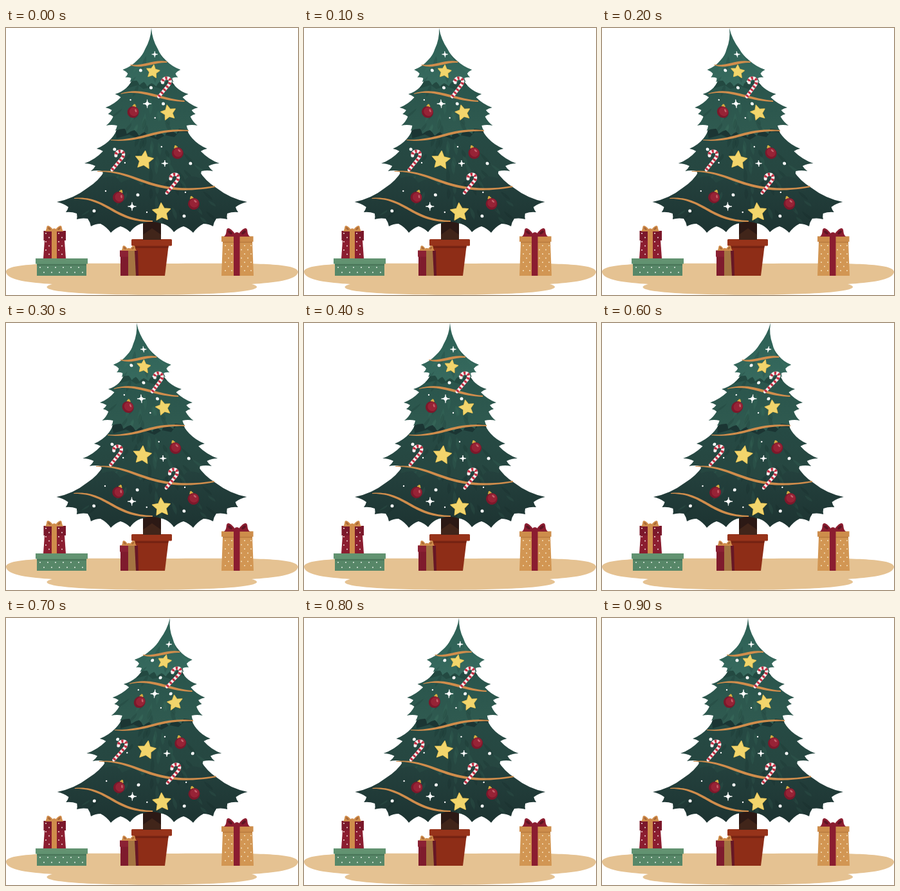
Recreate the animation shown at these times as an HTML page with a canvas. Size 454 by 416 pixels, loop 1000 ms.

```html
<!DOCTYPE html>
<html lang="en">
<head>
<meta charset="utf-8">
<title>Swaying tree</title>
<style>
html, body { margin: 0; width: 100%; height: 100%; overflow: hidden; background: #fff; }
canvas { display: block; }
</style>
</head>
<body>
<canvas id="stage" width="454" height="416"></canvas>
<script>
const ctx = document.getElementById('stage').getContext('2d');
const MID = 227, BASE = 320, STEP = 100;
const SWAY = [-1, -17, -29, -24, 0, 22, 35, 28, 14, 0];
const GOLD = '#d08d4c', RED = '#8b1d30', WHITE = '#fff';
let sway = 0;

// The trunk end stays put; displacement grows with height squared.
function bend(x, y) {
  const h = Math.max(0, BASE - y) / BASE;
  return [x + sway * h * h, y];
}

function at(x, y, draw) {
  const h = Math.max(0, BASE - y) / BASE;
  ctx.save();
  ctx.transform(1, 0, -2 * sway * h / BASE, 1, ...bend(x, y));
  draw();
  ctx.restore();
}

function fill(color) {
  ctx.fillStyle = color;
  ctx.fill();
}

function poly(color, ...p) {
  ctx.beginPath();
  for (let i = 0; i < p.length; i += 2) ctx.lineTo(p[i], p[i + 1]);
  ctx.closePath();
  fill(color);
}

function rect(color, x, y, w, h) {
  ctx.fillStyle = color;
  ctx.fillRect(x, y, w, h);
}

function oval(color, x, y, rx, ry = rx, turn = 0) {
  ctx.beginPath();
  ctx.ellipse(x, y, rx, ry, turn, 0, Math.PI * 2);
  fill(color);
}

function random(seed) {
  return () => (seed = seed * 16807 % 2147483647) / 2147483647;
}

// Right half of each tier; the left half is its mirror image.
const TIERS = [
  { top: '#25433f', low: '#1d3432', y0: 218, y1: 318, w: 140, n: 30, pts: [
    227, 190, 300, 222, 327, 249, 375, 271, 357, 279, 361, 287, 344, 289, 344, 298,
    327, 297, 322, 309, 307, 305, 291, 319, 276, 309, 261, 318, 249, 307, 239, 304, 227, 302] },
  { top: '#264a44', low: '#264640', y0: 165, y1: 240, w: 100, n: 24, pts: [
    227, 130, 280, 154, 290, 172, 313, 188, 303, 192, 332, 211, 315, 215, 322, 223,
    304, 223, 303, 234, 285, 231, 275, 241, 258, 235, 244, 245, 227, 239] },
  { top: '#2a554c', low: '#2f5a50', y0: 88, y1: 164, w: 70, n: 18, pts: [
    227, 68, 256, 78, 266, 93, 284, 103, 275, 108, 299, 124, 289, 128, 295, 134,
    287, 138, 298, 152, 281, 152, 284, 160, 269, 157, 266, 165, 254, 159,
    247, 168, 238, 162, 233, 170, 227, 165] },
  { top: '#2f6257', low: '#376a5e', y0: 30, y1: 88, w: 42, n: 9, pts: [
    227, 0, 237, 33, 249, 50, 272, 65, 264, 71, 268, 77, 259, 78, 261, 84,
    250, 82, 246, 89, 239, 84, 234, 91, 227, 86] }
];

function outline(flat) {
  const half = [];
  for (let i = 0; i < flat.length; i += 2) half.push([flat[i], flat[i + 1]]);
  ctx.beginPath();
  ctx.moveTo(...bend(...half[0]));
  const side = (list, flip) => {
    for (let i = 1; i < list.length; i++) {
      const [ax, ay] = list[i - 1], [bx, by] = list[i];
      const sag = 0.12 * flip;
      const cx = (ax + bx) / 2 - (by - ay) * sag;
      const cy = (ay + by) / 2 + (bx - ax) * sag;
      ctx.quadraticCurveTo(...bend(cx, cy), ...bend(bx, by));
    }
  };
  side(half, 1);
  side(half.map(([x, y]) => [2 * MID - x, y]).reverse(), 1);
  ctx.closePath();
}

function leaves(tier, seed) {
  const rnd = random(seed);
  for (let i = 0; i < tier.n; i++) {
    const y = tier.y0 + rnd() * (tier.y1 - tier.y0);
    const spread = (rnd() * 2 - 1) * tier.w * (0.35 + 0.65 * (y - tier.y0) / (tier.y1 - tier.y0));
    const x = MID + spread, len = 14 + rnd() * 16, lean = spread / tier.w;
    const ex = x + lean * len * 1.2, ey = y + len * (1 - Math.abs(lean) * 0.55);
    ctx.beginPath();
    ctx.moveTo(...bend(x, y));
    ctx.quadraticCurveTo(...bend((x + ex) / 2 + 7, (y + ey) / 2), ...bend(ex, ey));
    ctx.quadraticCurveTo(...bend((x + ex) / 2 - 5, (y + ey) / 2 + 1), ...bend(x, y));
    fill(i % 2 ? 'rgba(75,130,112,.13)' : 'rgba(8,24,25,.13)');
  }
}

function shade(color, ...p) {
  ctx.beginPath();
  for (let i = 0; i < p.length; i += 2) ctx.lineTo(...bend(p[i], p[i + 1]));
  fill(color);
}

function drawTier(tier, i) {
  outline(tier.pts);
  const g = ctx.createLinearGradient(0, tier.y0, 0, tier.y1);
  g.addColorStop(0, tier.top);
  g.addColorStop(1, tier.low);
  ctx.save();
  fill(g);
  ctx.clip();
  leaves(tier, 71 + i * 37);
  if (i === 1) shade('#1b3533', 170, 150, 284, 150, 285, 163, 270, 161, 262, 170, 248, 167,
    236, 174, 220, 168, 205, 172, 192, 166, 172, 172);
  if (i === 2) shade('#234941', 196, 76, 258, 76, 266, 90, 252, 89, 244, 96, 230, 91,
    214, 95, 206, 89, 188, 94);
  ctx.restore();
}

// Ribbon band that tapers to a point at both ends.
function garland(x0, y0, x1, y1, x2, y2, x3, y3) {
  ctx.beginPath();
  ctx.moveTo(...bend(x0, y0));
  ctx.bezierCurveTo(...bend(x1, y1 - 2), ...bend(x2, y2 - 2), ...bend(x3, y3 - 1));
  ctx.lineTo(...bend(x3, y3 + 1));
  ctx.bezierCurveTo(...bend(x2, y2 + 3), ...bend(x1, y1 + 3), ...bend(x0, y0 + 1));
  fill(GOLD);
}

function star(x, y, r, turn) {
  at(x, y, () => {
    ctx.rotate(turn);
    ctx.beginPath();
    for (let k = 0; k < 10; k++) {
      const a = k * Math.PI / 5 - Math.PI / 2, d = k % 2 ? r * 0.5 : r;
      ctx.lineTo(Math.cos(a) * d, Math.sin(a) * d);
    }
    ctx.closePath();
    ctx.lineJoin = 'round';
    ctx.lineWidth = 1.5;
    ctx.strokeStyle = '#e3bd50';
    ctx.stroke();
    fill('#f2d56c');
  });
}

function bauble(x, y, tilt) {
  at(x, y, () => {
    ctx.rotate(tilt);
    oval('#d8ae42', 0, -11, 1.8);
    rect('#d8ae42', -2.8, -10.5, 5.6, 4);
    oval('#7c182b', 0, 0, 9);
    oval('#972336', 1, -1, 7);
    oval('#c5606a', 3.6, -3, 1.3, 2.6, -0.5);
  });
}

function cane(x, y) {
  at(x, y, () => {
    ctx.beginPath();
    ctx.moveTo(0, 0);
    ctx.lineTo(16, -19);
    ctx.bezierCurveTo(20, -25, 17, -29, 13, -29);
    ctx.bezierCurveTo(8, -29, 6, -26, 6, -22);
    ctx.lineCap = 'round';
    ctx.lineWidth = 5;
    ctx.strokeStyle = '#f7eeee';
    ctx.stroke();
    ctx.lineCap = 'butt';
    ctx.setLineDash([3, 3.3]);
    ctx.strokeStyle = '#c22f43';
    ctx.stroke();
  });
}

function sparkle(x, y, r) {
  at(x, y, () => {
    ctx.beginPath();
    ctx.moveTo(0, -r);
    for (const [px, py] of [[r, 0], [0, r], [-r, 0], [0, -r]]) ctx.quadraticCurveTo(0, 0, px, py);
    ctx.lineWidth = 0.8;
    ctx.strokeStyle = WHITE;
    ctx.stroke();
    fill(WHITE);
  });
}

const dot = (x, y, r) => at(x, y, () => oval(WHITE, 0, 0, r));

function drawTree() {
  rect('#41251a', 213, 300, 28, 30);
  poly('#2c1915', 213, 300, 241, 300, 241, 322, 227, 312, 213, 322);
  TIERS.forEach(drawTier);

  garland(194, 57, 213, 62, 230, 50, 251, 53);
  garland(179, 102, 213, 92, 240, 112, 278, 114);
  garland(163, 174, 215, 177, 228, 156, 284, 160);
  garland(142, 223, 203, 219, 223, 264, 325, 247);
  garland(106, 265, 157, 262, 168, 301, 228, 301);

  [[238, 107], [165, 221], [250, 257]].forEach(p => cane(...p));
  [[229, 68, 10.5, 0.15], [253, 132, 12, -0.2], [215, 206, 14.5, 0.12], [242, 287, 14.5, -0.06]]
    .forEach(p => star(...p));
  [[198, 131, 0.2], [267, 195, -0.3], [175, 264, 0.4], [292, 274, -0.35]].forEach(p => bauble(...p));
  [[232, 41, 4.5], [220, 118, 6.5], [247, 211, 5], [196, 278, 6.5]].forEach(p => sparkle(...p));
  [[210, 66], [226, 93], [245, 118], [169, 189], [287, 211], [205, 260], [137, 285], [277, 293]]
    .forEach(p => dot(...p, 2.5));
  [[194, 112], [232, 140], [242, 185], [185, 210], [155, 254], [279, 256], [219, 287], [242, 83]]
    .forEach(p => dot(...p, 1.2));
}

function bow(x, y, w, h, color, inner) {
  for (const s of [-1, 1]) {
    ctx.beginPath();
    ctx.moveTo(x, y);
    ctx.bezierCurveTo(x + s * w * 0.35, y - h * 0.9, x + s * w * 0.8, y - h * 1.4, x + s * w * 0.82, y - h * 0.6);
    ctx.quadraticCurveTo(x + s * w * 0.85, y - h * 0.2, x + s * w, y);
    ctx.closePath();
    fill(color);
    oval(inner, x + s * w * 0.53, y - h * 0.5, w * 0.2, h * 0.16, -s * 0.7);
  }
  oval(color, x, y - h * 0.25, w * 0.2, h * 0.27);
}

function speckle(x, y, w, h, gap, r, color) {
  for (let row = 0, py = y; py <= y + h; row++, py += gap * 0.65)
    for (let px = x + (row % 2) * gap / 2; px <= x + w; px += gap) oval(color, px, py, r);
}

function drawGround() {
  oval('#e5c292', 227, 380, 227, 12);
  ctx.beginPath();
  ctx.moveTo(0, 380);
  ctx.bezierCurveTo(0, 364, 95, 367, 227, 367);
  ctx.bezierCurveTo(360, 367, 454, 364, 454, 380);
  ctx.bezierCurveTo(453, 393, 415, 397, 382, 399);
  ctx.bezierCurveTo(400, 404, 387, 409, 350, 412);
  ctx.bezierCurveTo(285, 417, 160, 417, 102, 412);
  ctx.bezierCurveTo(65, 409, 54, 404, 72, 399);
  ctx.bezierCurveTo(38, 397, 1, 393, 0, 380);
  fill('#e5c292');
}

function drawPot() {
  poly('#8e2d17', 199, 337, 253, 337, 247, 386, 204, 386);
  poly('#762312', 199, 339, 253, 339, 252, 343, 200, 343);
  ctx.beginPath();
  ctx.roundRect(195, 329, 63, 10.5, 1.5);
  fill('#97331a');
}

function drawGifts() {
  rect('#578768', 48, 367, 77, 19);
  rect('#4a7659', 48, 368, 77, 2);
  speckle(53, 373, 69, 9, 12, 1, '#e5eee5');
  rect('#629371', 46, 359, 81, 8.5);

  poly(RED, 60, 331, 91, 331, 93, 359, 58, 359);
  rect('#7b182b', 58.5, 316, 34.5, 15);
  speckle(62, 320, 29, 36, 10, 1, '#f3dfdd');
  rect(GOLD, 71, 316, 8, 43);
  bow(75, 317, 14.5, 9, GOLD, '#a86835');

  rect('#7f1b2d', 178, 356, 27, 30);
  rect('#8b2134', 177, 346.5, 28, 10);
  poly('#671725', 200, 347, 205, 347, 206, 386, 201, 386);
  poly('#a57542', 190, 347, 200, 347, 202, 386, 190, 386);
  bow(191, 347, 12, 8, GOLD, '#a86835');

  poly('#d29653', 337, 333, 383, 333, 385, 386, 335, 386);
  speckle(341, 339, 42, 44, 10, 1, '#f4dfbb');
  rect('#cd8d4b', 335, 324.5, 49.5, 8.5);
  rect('#b97c3f', 337, 333, 46, 1.5);
  rect(RED, 354, 324.5, 9.5, 61.5);
  bow(359, 325, 20, 13, RED, '#5f1423');
}

function frame(now) {
  sway = SWAY[Math.floor(now / STEP) % SWAY.length];
  rect(WHITE, 0, 0, 454, 416);
  drawGround();
  drawPot();
  drawTree();
  drawGifts();
}

const start = performance.now();
(function loop() {
  frame(performance.now() - start);
  requestAnimationFrame(loop);
})();
</script>
</body>
</html>
```
